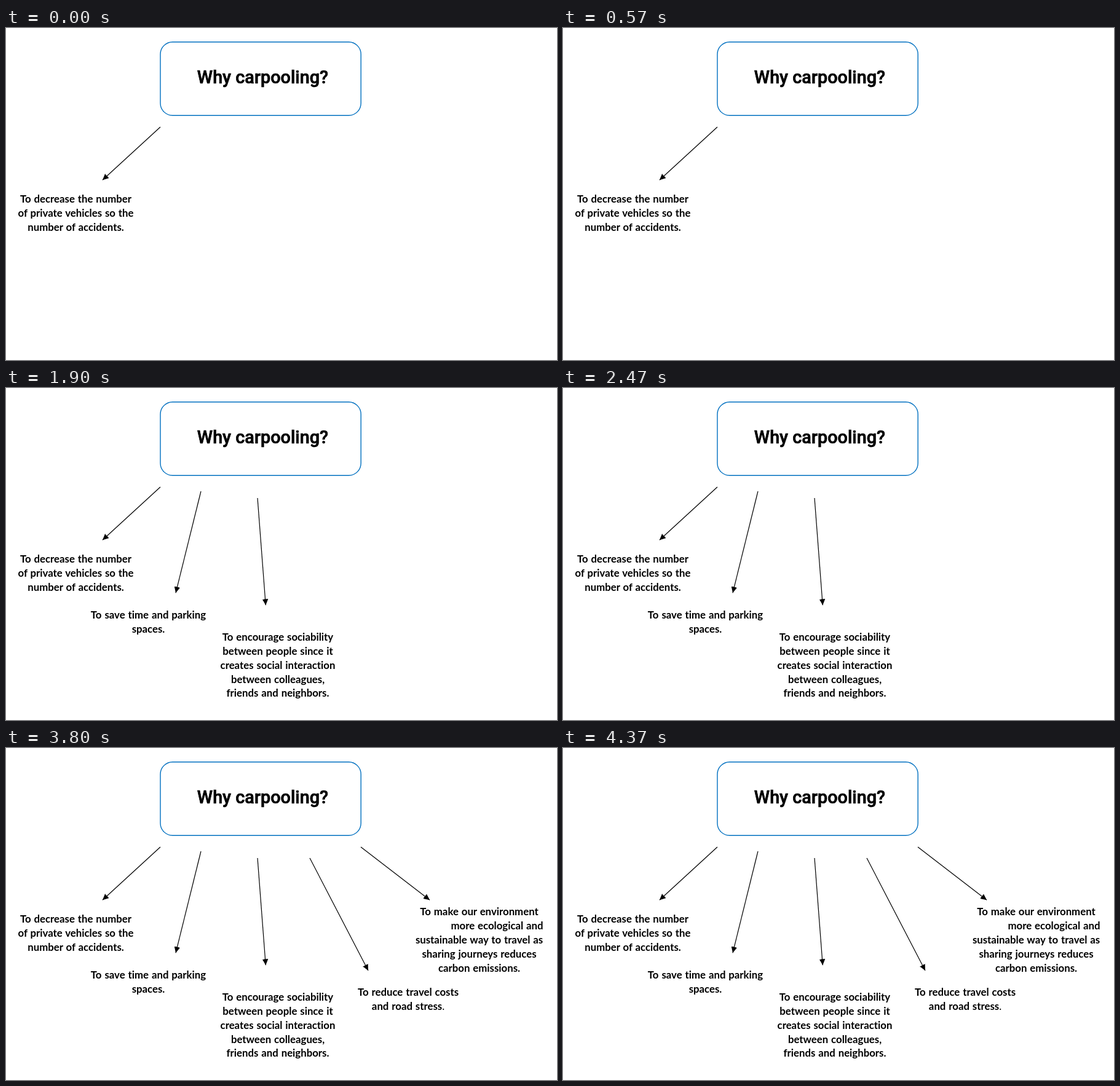
Recreate the animation shown at these times as an HTML page. Size 896 by 540 pixels, loop 4.75 s.

```html
<!DOCTYPE html>
<html lang="en">
<head>
<meta charset="utf-8">
<title>Why carpooling?</title>
<style>
  html, body { margin: 0; width: 100%; height: 100%; overflow: hidden; background: #fff; }
  svg { display: block; }
  text { text-anchor: middle; }
  .title { font: 500 28.75px Roboto, sans-serif; stroke: #000; stroke-width: .7px; }
  .reason text { font: bold 16.8px Lato, Carlito, sans-serif; word-spacing: .8px; font-variant-ligatures: none; }
  .reason line { stroke: #000; stroke-width: 1.2px; }
</style>
</head>
<body>
<svg id="stage" width="896" height="540" viewBox="0 0 896 540">
  <marker id="head" markerUnits="userSpaceOnUse" markerWidth="10" markerHeight="10" refX="10" refY="5" orient="auto">
    <path d="M0 .2 10 5 0 9.8z"/>
  </marker>
  <rect x="251" y="22.8" width="326.2" height="119.4" rx="19.9" fill="none" stroke="#0070c0" stroke-width="1.4"/>
  <text class="title" x="417.4" y="90">Why carpooling?</text>
</svg>
<script>
const STEP = 950;
const stage = document.getElementById('stage');

// arrow: x1, y1, x2, y2; text: centre x, first baseline, line height
const reasons = [
  { arrow: [251, 161, 157, 247.3], text: [113.5, 284, 23],
    lines: ['To decrease the number', 'of private vehicles so the', 'number of accidents.'] },
  { arrow: [317, 168, 276, 333.3], text: [231.5, 375, 23],
    lines: ['To save time and parking', 'spaces.'] },
  { arrow: [409, 179, 422.3, 353.3], text: [442, 411, 22.85],
    lines: ['To encourage sociability', 'between people since it', 'creates social interaction',
      'between colleagues,', 'friends and neighbors.'] },
  { arrow: [494, 179, 589, 362], text: [654, 403, 23],
    lines: ['To reduce travel costs', 'and road stress<tspan font-weight="400">.</tspan>'] },
  { arrow: [577, 161, 689, 247.3], text: [769.5, 272, 23.1],
    lines: ['To make our environment', '<tspan dx="29">more ecological and</tspan>',
      'sustainable way to travel as', 'sharing journeys reduces', 'carbon emissions.'] },
];

const groups = reasons.map(({ arrow: [x1, y1, x2, y2], text: [x, y, leading], lines }) => {
  const group = document.createElementNS('http://www.w3.org/2000/svg', 'g');
  group.setAttribute('class', 'reason');
  group.innerHTML =
    `<line x1="${x1}" y1="${y1}" x2="${x2}" y2="${y2}" marker-end="url(#head)"/>` +
    lines.map((line, i) => `<text x="${x}" y="${Math.round(y + i * leading)}">${line}</text>`).join('');
  return stage.appendChild(group);
});

function draw() {
  const step = Math.floor(performance.now() / STEP) % reasons.length;
  groups.forEach((group, i) => group.setAttribute('visibility', i <= step ? 'visible' : 'hidden'));
  requestAnimationFrame(draw);
}
draw();
</script>
</body>
</html>
```
